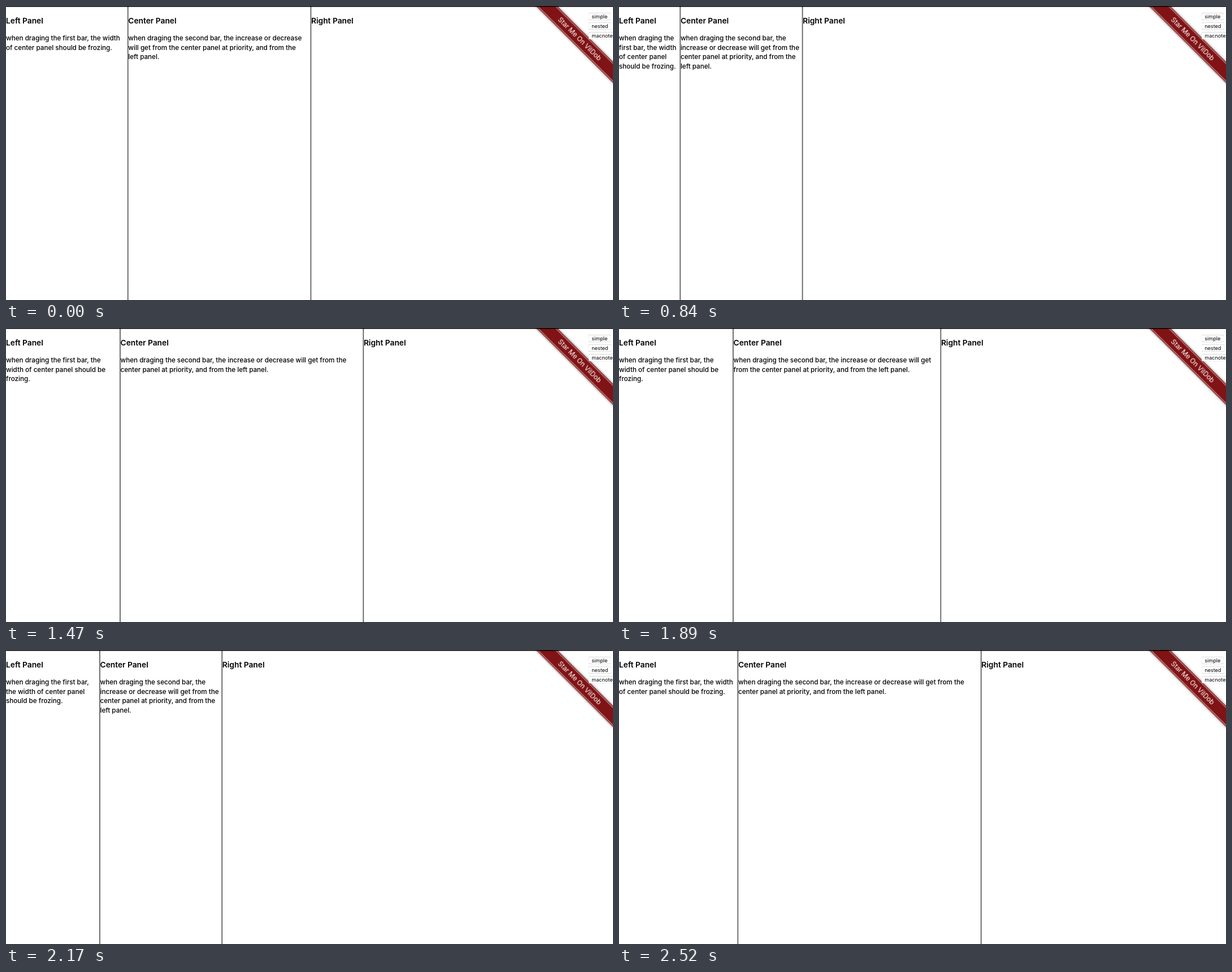
An HTML page that plays this animation: 1074x521 px, repeating every 2590 ms.

```html
<!DOCTYPE html>
<html lang="en">
<head>
<meta charset="utf-8">
<title>Resizable panels</title>
<style>
  html, body { margin: 0; width: 100%; height: 100%; overflow: hidden; background: #fff; }
  svg { display: block; width: 100%; height: 100%; font-family: Inter, "Liberation Sans", sans-serif; }
  .head { font-size: 13.75px; font-weight: 600; }
  .body { font-size: 11.67px; font-weight: 500; }
  .bar { fill: #606060; }
  .ribbon { filter: drop-shadow(0 0 2px rgba(0, 0, 0, .5)); }
  .ribbon text { font-size: 11.8px; fill: #fff; }
  .stitch { stroke: #fff; stroke-opacity: .8; stroke-width: .9; }
  .button rect { fill: #fff; stroke: rgba(0, 0, 0, .08); stroke-width: .5; filter: drop-shadow(0 .6px .7px rgba(0, 0, 0, .5)); }
  .button text { font-size: 9.1px; }
</style>
</head>
<body>
<svg id="stage" viewBox="0 0 1074 521" xmlns="http://www.w3.org/2000/svg"></svg>
<script>
const STAGE = 1074, LOOP = 2590, STEP = 70;
const BAR = 1.5, LINE = 16.45;
const MIN_CENTER = STAGE * 0.2, MAX_CENTER = STAGE * 0.4 - 0.7;
const START = { first: STAGE * 0.2, second: STAGE * 0.5 + BAR };

// Positions of the second bar while dragged, one per step
const DRAGS = [
  { at: 560, xs: [496.4, 453, 405, 358, 323.7] },
  { at: 1120, xs: [365, 465, 570, 631.4] },
  { at: 1890, xs: [568.4, 512, 455, 408, 381.3, 432, 548, 639, 639.4, 639.8] }
];

const LEFT_TEXT = "when draging the first bar, the width of center panel should be frozing.";
const CENTER_TEXT = "when draging the second bar, the increase or decrease will get from " +
  "the center panel at priority, and from the left panel.";

const svg = document.getElementById("stage");

function add(parent, tag, attrs, text) {
  const el = document.createElementNS("http://www.w3.org/2000/svg", tag);
  for (const key in attrs) el.setAttribute(key, attrs[key]);
  if (text) el.textContent = text;
  parent.append(el);
  return el;
}

// Line breaking uses widths relative to a reference line
const pen = document.createElement("canvas").getContext("2d");
pen.font = '100px Inter, "Liberation Sans", sans-serif';
const unit = 205.3 / pen.measureText("when draging the first bar, the width").width;
const widthOf = text => pen.measureText(text).width * unit;

function wrap(text, room) {
  const lines = [""];
  for (const word of text.split(" ")) {
    const last = lines[lines.length - 1];
    const longer = last ? last + " " + word : word;
    if (last && widthOf(longer) > room) lines.push(word);
    else lines[lines.length - 1] = longer;
  }
  return lines;
}

function makePanel(title, copy) {
  const group = add(svg, "g", {});
  add(group, "text", { class: "head", x: 0, y: 30.6 }, title);
  const body = add(group, "text", { class: "body" });
  let shown = "";
  return (x, room) => {
    group.setAttribute("transform", `translate(${x} 0)`);
    if (!copy) return;
    const lines = wrap(copy, room);
    if (lines.join("|") === shown) return;
    shown = lines.join("|");
    body.textContent = "";
    lines.forEach((line, i) => add(body, "tspan", { x: 0, y: 61.3 + i * LINE }, line));
  };
}

function makeBar() {
  return add(svg, "rect", { class: "bar", y: 0, width: 1.8, height: 521 });
}

function drawRibbon() {
  const half = 13.1, inset = 2;
  const ribbon = add(svg, "g", { class: "ribbon", transform: "translate(1015.7 59.3) rotate(45)" });
  add(ribbon, "rect", { x: -140, y: -half, width: 280, height: half * 2, fill: "#801315" });
  for (const y of [inset - half, half - inset]) {
    add(ribbon, "line", { class: "stitch", x1: -140, x2: 140, y1: y, y2: y });
  }
  add(ribbon, "text", { x: -52.5, y: 3.9 }, "Star Me On VilDob");
}

function drawButton(label, y, width) {
  const button = add(svg, "g", { class: "button", transform: `translate(1031 ${y})` });
  add(button, "rect", { width, height: 12.6, rx: 2.5 });
  add(button, "text", { x: 5.2, y: 9.5 }, label);
}

const firstBar = makeBar(), secondBar = makeBar();
const left = makePanel("Left Panel", LEFT_TEXT);
const center = makePanel("Center Panel", CENTER_TEXT);
const right = makePanel("Right Panel");
drawRibbon();
drawButton("simple", 12.2, 39);
drawButton("nested", 29.2, 40);
drawButton("macnote", 46.4, 48);
add(svg, "rect", { width: STAGE, height: 1.5 });

// The center panel gives or takes first; the left panel follows at its limits
function layout(time) {
  let { first, second } = START;
  for (const { at, xs } of DRAGS) {
    xs.forEach((x, i) => {
      if (time < at + i * STEP) return;
      second = x;
      const edge = second - BAR;
      first = Math.min(Math.max(first, edge - MAX_CENTER), edge - MIN_CENTER);
    });
  }
  return { first, second };
}

function render(time) {
  const { first, second } = layout(time);
  firstBar.setAttribute("x", first);
  secondBar.setAttribute("x", second);
  left(0, first);
  center(first + BAR, second - first - BAR);
  right(second + BAR);
}

const begun = performance.now();
function tick() {
  render((performance.now() - begun) % LOOP);
  requestAnimationFrame(tick);
}
tick();
</script>
</body>
</html>
```
